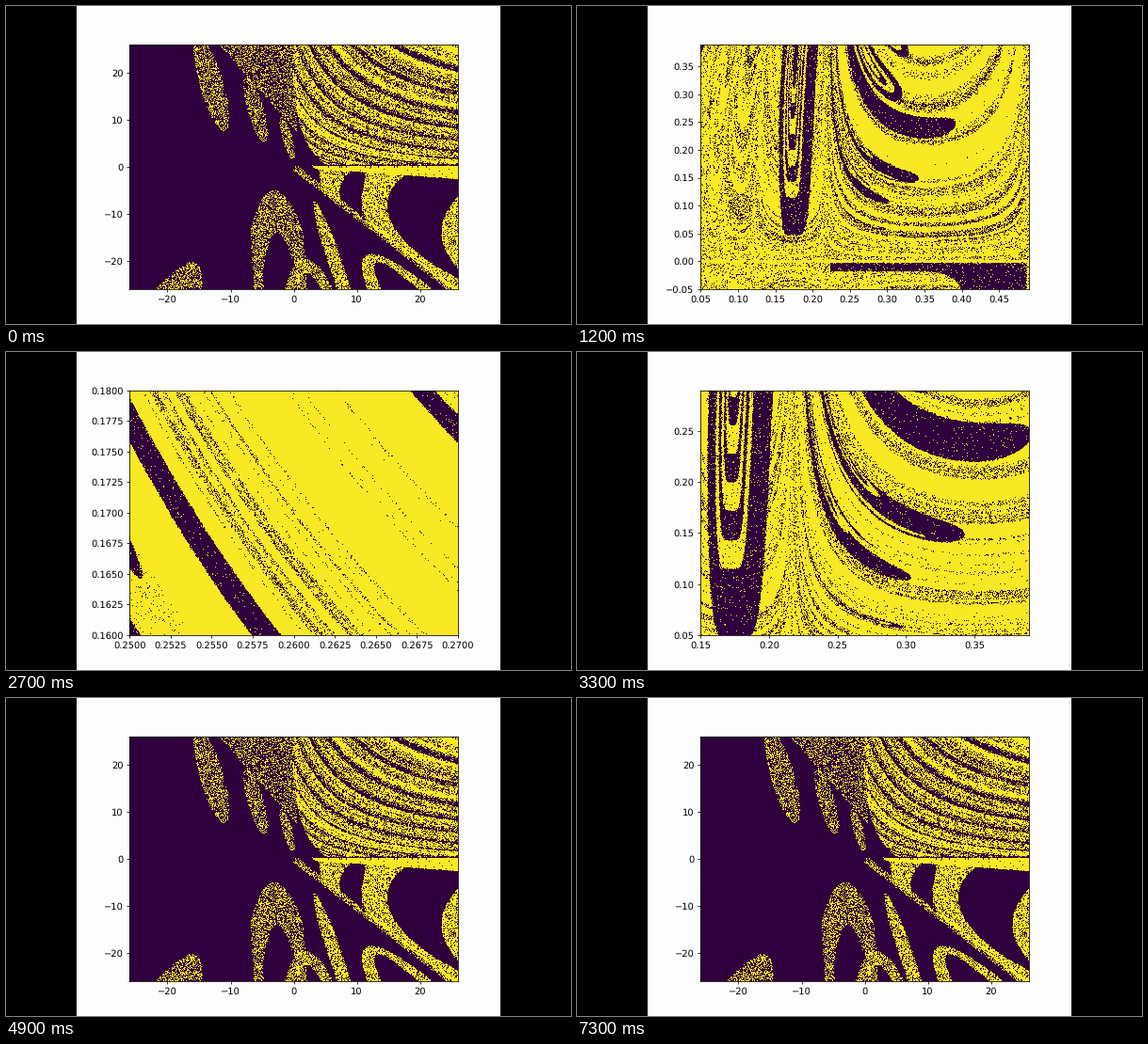
A matplotlib script that plays this animation: 600 by 338 pixels, repeating every 7.4 s.

```python
import numpy as np
import matplotlib.pyplot as plt
from matplotlib.animation import FuncAnimation
from matplotlib.colors import ListedColormap
from matplotlib.patches import Rectangle

W, H, DPI = 600, 338, 100
L, R, T, B = 131.25, 480.0, 40.6, 300.8      # plot box on the stage
NX, NY = 349, 260
HOLD, FRAMES, STEP = 4, 74, 100
SCALE = 450 / 640

# zoom levels: x0, x1, y0, y1
VIEWS = [(-26, 26, -26, 26), (-5, 5, -5, 5), (-0.65, 1.2, -0.75, 1.1),
         (0.05, 0.49, -0.05, 0.39), (0.15, 0.39, 0.05, 0.29),
         (0.23, 0.29, 0.15, 0.19), (0.25, 0.27, 0.16, 0.18)]

TABLE = np.random.default_rng(3).random(512)


def streak(u):
    """Smooth 1D noise of u in two octaves."""
    k = np.arange(512)
    return (0.5 * np.interp(u, k, TABLE, period=512)
            + 0.5 * np.interp(2.7 * u + 90, k, TABLE, period=512))


class Canvas:
    def __init__(self, view, jitter=0.35):
        x0, x1, y0, y1 = view
        self.width = x1 - x0
        self.rng = np.random.default_rng(11)
        col, row = np.meshgrid(np.arange(NX) + 0.5, np.arange(NY) + 0.5)
        col = col + self.rng.normal(0, jitter, col.shape)
        row = row + self.rng.normal(0, jitter, row.shape)
        self.x = x0 + col / NX * (x1 - x0)
        self.y = y1 - row / NY * (y1 - y0)
        self.img = np.zeros((NY, NX))

    def put(self, mask, on, p=1.0):
        self.img[mask & (self.rng.random(mask.shape) < p)] = on


def draw_far(c):
    x, y = c.x, c.y
    depth = np.maximum(-y, 0)
    # hyperbolic streaks, upper right
    v = np.log(np.maximum(x + 6.8, 0.1) * np.maximum(y + 5.85, 0.1)) - 0.0188 * (x - 3.7)
    field = (y > 0.3) & (x > 5.5 * np.exp(-y / 6) - 0.3)
    c.put(field, 1, 0.72 + 1.2 * (streak(24 * v) - 0.5))
    c.put(field & (np.cos(2 * np.pi * (v - 4.855) / 0.213) > 0.8), 0, 0.85)
    # dusty wedge and leaves, upper left
    c.put((y > 8 - 1.5 * x) & (x < 0.5), 1, 0.3)
    for cx, cy, half, tall in ((-13, 17.5, 1.9, 10), (-6, 12, 1.3, 7), (-1, 6, 0.8, 4.5)):
        lean = x - cx + 0.2 * (y - cy)
        c.put((lean / half) ** 2 + ((y - cy) / tall) ** 2 < 1, 1, 0.4)
    # band below the axis, diagonal and arms
    low = (y < 0) & (x > 0)
    c.put(low & (depth < 0.1 * x) & (x > 3), 1, 0.98)
    c.put(low & (abs(y + 1.04 * x) < 0.8), 1, 0.5)
    for ax_, ay, half in ((5.8, 5, 1.3), (12.8, 8, 2.0), (24.8, 14, 1.4)):
        off = abs(x - ax_ - 0.045 * (depth - ay) ** 2)
        c.put(low & (off < half * (1 + 1.5 * np.exp(-depth / 2))) & (depth < 1.04 * x), 1, 0.75)
    # arches: apex, half width, lean, thickness, density
    for ax_, ay, half, lean, thick, p in ((12.3, -18.5, 5, 0.6, 1.8, 0.75), (3.3, -7.3, 1, 0.25, 99, 0.7),
                                          (1.8, -19.6, 4, 0.1, 3, 0.5), (-3.1, -5, 3.8, 0.05, 9, 0.42),
                                          (-16, -20.3, 4, -0.38, 99, 0.45)):
        t = ay - y
        off = abs(x - ax_ - lean * t)
        outer = off < half * np.sqrt(np.clip(t / 7, 0, 1.2))
        inner = off < 0.65 * half * np.sqrt(np.clip((t - thick) / 7, 0, 1.2))
        c.put(outer & ~inner, 1, p)


def draw_near(c, inside=True):
    x, y = c.x, c.y
    h = np.maximum(abs(y), 1e-4)
    # cells narrow towards x = 0; their walls lie at whole values of n
    edge = 0.37 * y ** 2
    sx = x - edge * np.exp(-np.maximum(x - edge, 0) / 0.06)
    n = (1 / np.sqrt(np.maximum(sx, 1e-4)) - 0.71) / 0.72
    cell = np.floor(n)
    s = n - cell

    def level(s, h):
        return np.log(h) + 0.55 * np.log(np.sin(np.pi * s ** 0.66) + 0.004)

    u = level(s, h)
    body = (sx > 0) & inside
    freq = max(12, 6.5 * c.width ** -0.9)
    mean = min(0.97 - 0.12 * np.log(c.width / 0.24), 1.15)
    grain = 0.6 * streak(freq * u + 37 * cell) + 0.4 * streak(9 * u + 53 * cell)
    c.put(body, 1, mean + 2 * (grain - 0.5))

    def tongue(box, s0, u0, w, on, rings=1, reach=3.0, way=1):
        """Hairpin along the level lines, with smaller ones nested inside."""
        for k in range(rings):
            d = np.maximum(way * (s - s0) - 0.04 * k, 0)
            half = w * 0.62 ** k * np.sqrt(1 - np.exp(-d / 0.06)) * np.exp(-d / reach)
            c.put(body & (cell == box) & (y > 0) & (abs(u - u0) < half), (on + k) % 2, 0.97)

    rng = np.random.default_rng(8)
    for _ in range(36):
        u0 = -2.45 - 1.9 * rng.random() if rng.random() < 0.7 else -1.25 + 0.7 * rng.random()
        tongue(rng.integers(0, 4), rng.uniform(0.25, 0.75), u0, rng.uniform(0.02, 0.08),
               0, 3, 0.25, rng.choice((-1, 1)))

    # main hairpins: tip, half width, colour, rings
    for tx, ty, w, on, rings in ((0.392, 0.247, 0.09, 0, 1), (0.320, 0.300, 0.10, 0, 4),
                                 (0.343, 0.149, 0.09, 0, 1), (0.315, 0.1465, 0.013, 1, 1),
                                 (0.281, 0.185, 0.035, 1, 4), (0.304, 0.1065, 0.078, 0, 1),
                                 (0.258, 0.1506, 0.045, 1, 4), (0.279, 0.135, 0.011, 0, 1)):
        s0 = (1 / np.sqrt(tx) - 0.71) / 0.72 - 1
        tongue(1, s0, level(s0, ty), w, on, rings)

    # deep pocket in the next cell
    def pocket(mid, half, y0, on):
        c.put(body & (y - y0 > 0.1 * ((n - mid) / half) ** 6), on, 0.95)

    pocket(2.34, 0.2, 0.047, 0)
    for k in range(8):
        pocket(2.365, 0.125 * 0.84 ** k, 0.115 + 0.028 * k, (k + 1) % 2)

    # dark frame under the axis
    wall = 0.018 + 0.35 * (np.maximum(x - 0.33, 0) / 0.13) ** 4
    c.put(body & (y < -0.003) & (x > 0.224) & (x < 0.487) & (h < wall), 0, 0.95)

    # hyperbolic bands on the right
    a = np.maximum(x - 0.48, 0) * h
    right = body & (x > 0.5)
    up, down = right & (y > 0), right & (y < 0)
    c.put(up & (a > 0.023) & (a < 0.036), 0)
    c.put(up & (a > 0.2 - 0.16 * np.clip((x - 0.93) / 0.2, 0, 1)) & (a < 0.42) & (h > 0.05), 0)
    c.put(down & (x > 0.87) & (a > 0.07) & (a < 0.4), 0)
    c.put(down & (x < 0.86) & (a > 0.1) & (a < 0.17), 0)
    c.put(body & (h < 0.0025), 1)


def render(view):
    c = Canvas(view)
    if c.width > 2:
        draw_far(c)
    if c.width < 20:
        draw_near(c, (c.x < 1.2) & (abs(c.y) < 1.1))
    return c.img


IMAGES = [render(v) for v in VIEWS]

plt.rcParams.update({"font.family": "DejaVu Sans", "text.hinting": "none"})
fig = plt.figure(figsize=(W / DPI, H / DPI), dpi=DPI, facecolor="#fdfdfd")
for left in (0, 525):
    fig.add_artist(Rectangle((left / W, 0), 75 / W, 1, color="black", lw=0))

ax = fig.add_axes([L / W, 1 - B / H, (R - L) / W, (B - T) / H])
ax.tick_params(labelsize=10.1 * SCALE, length=3.5 * SCALE, width=0.8 * SCALE, pad=3.5 * SCALE)
for spine in ax.spines.values():
    spine.set_linewidth(0.8 * SCALE)
picture = ax.imshow(IMAGES[0], cmap=ListedColormap(["#30003e", "#f9e824"]), vmin=0, vmax=1,
                    extent=VIEWS[0], aspect="auto", interpolation="nearest")


def update(i):
    level = 6 - abs(min(i // HOLD, 12) - 6)      # zoom in, back out, then rest
    x0, x1, y0, y1 = VIEWS[level]
    picture.set_data(IMAGES[level])
    picture.set_extent((x0, x1, y0, y1))
    ax.set_xlim(x0, x1)
    ax.set_ylim(y0, y1)
    return [picture]


anim = FuncAnimation(fig, update, frames=FRAMES, interval=STEP, repeat=True, repeat_delay=0)
plt.show()
```
